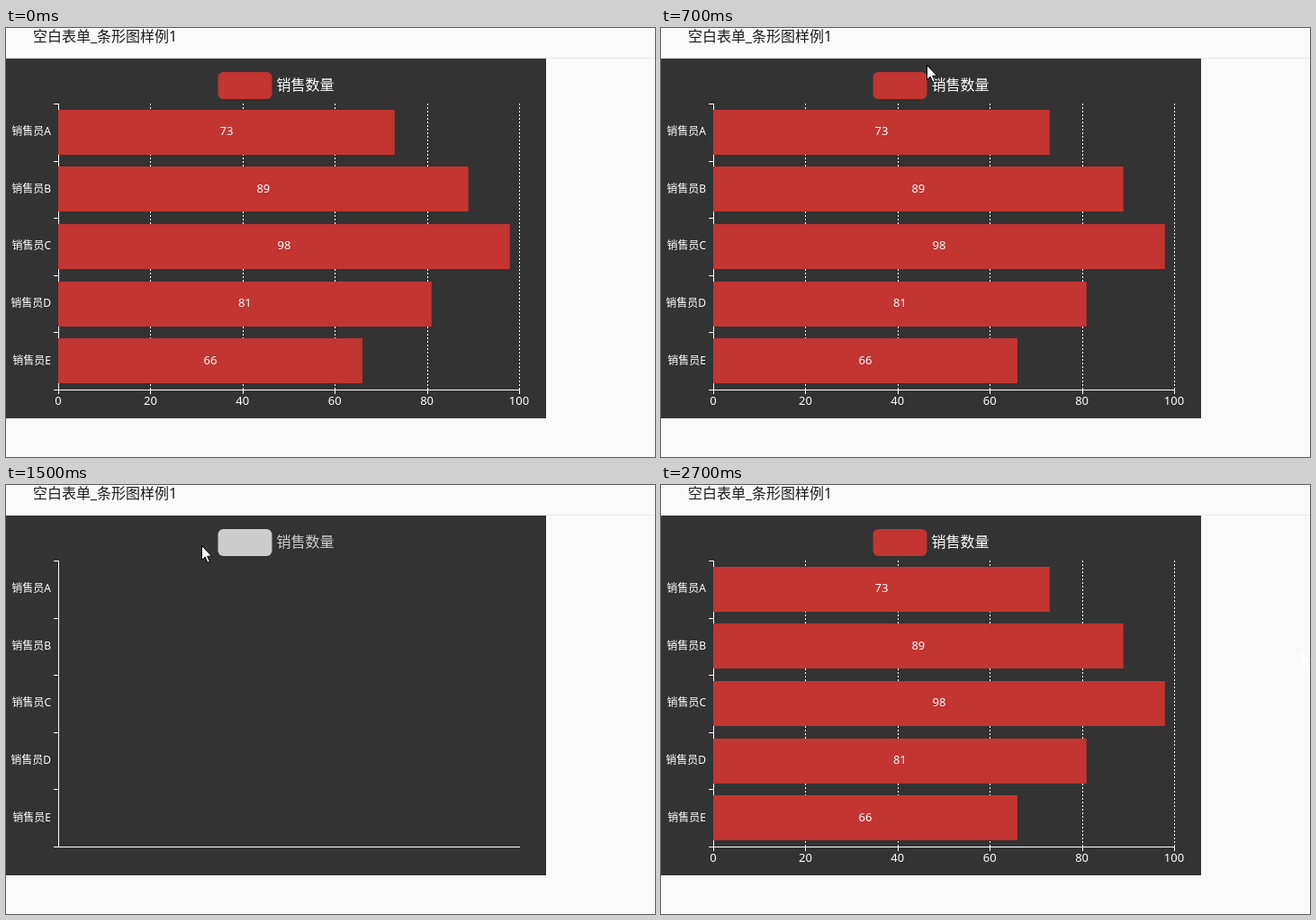
An HTML page with a canvas that plays this animation: 721 px wide and 477 px high, repeating every 3 s.

```html
<!DOCTYPE html>
<html lang="zh-CN">
<head>
<meta charset="utf-8">
<style>
  html, body { margin: 0; width: 100%; height: 100%; overflow: hidden; background: #fafafa; }
  canvas { display: block; }
</style>
</head>
<body>
<canvas id="stage" width="721" height="477"></canvas>
<script>
const ctx = document.getElementById('stage').getContext('2d');
const FONT = '"Noto Sans", "Noto Sans CJK SC", "Noto Sans CJK", sans-serif';
const LOOP = 3000, TICK = 100;
const RED = '#c23531', BRIGHT = '#d63a35', GREY = '#ccc';
const LEFT = 58, RIGHT = 570, TOP = 84, BOTTOM = 402;
const ROW = (BOTTOM - TOP) / 5, UNIT = (RIGHT - LEFT) / 100;
const data = [['A', 73], ['B', 89], ['C', 98], ['D', 81], ['E', 66]];

// [from tick, shape, x, y]; shape '' hides the pointer
const pointer = [
  [0, '', 0, 0],
  [3, 'arrow', 694, 376], [4, 'arrow', 388, 90], [5, 'arrow', 345, 70],
  [6, 'arrow', 313, 50], [7, 'arrow', 295, 41],
  [8, 'hand', 267, 55], [9, 'hand', 264, 62], [13, 'hand', 250, 64],
  [14, 'arrow', 226, 66], [15, 'arrow', 217, 67],
  [16, 'hand', 248, 69], [18, 'hand', 248, 68], [23, 'hand', 262, 70],
  [24, 'arrow', 377, 101], [25, 'arrow', 663, 208],
  [26, 'arrow', 690, 196], [27, 'arrow', 711, 184]
];
// [from tick, to tick, x, y, last tick with the row lit]
const tips = [[4, 5, 377, 120, 4], [24, 25, 397, 121, 24]];

const arrow = new Path2D('M.5 .5V16.5L4.2 13L7 19.3L9.4 18.2L6.7 12.2H11.6Z');
const hand = new Path2D('M6.2 .5C5 .5 4.6 1.5 4.6 2.5V13L3 11C2 9.8 .5 10.4 .6 11.8L4 17Q5.4 19 5.5 22.5H14Q14.3 19.5 16 16.5V9.6Q15.5 7.6 13.4 8.4Q12.5 6.6 10.6 7.5Q9.7 6 7.8 6.7V2.5C7.8 1.5 7.4 .5 6.2 .5Z');
const fingers = new Path2D('M7.8 7V11.5M10.6 7.8V11.5M13.4 8.6V12');

const cubicOut = t => 1 - (1 - t) ** 3;

function rect(x, y, w, h, fill, r = 0) {
  ctx.fillStyle = fill;
  ctx.beginPath();
  ctx.roundRect(x, y, w, h, r);
  ctx.fill();
}

function text(str, x, y, size, fill = '#fff', align = 'left', weight = 400) {
  ctx.font = `${weight} ${size}px ${FONT}`;
  ctx.textAlign = align;
  ctx.fillStyle = fill;
  ctx.fillText(str, x, y);
}

function drawPage() {
  rect(0, 0, 721, 477, '#fafafa');
  rect(0, 33, 721, 1, '#e8e8e8');
  text('空白表单_条形图样例1', 30, 15, 16, '#1a1a1a');
  rect(0, 34, 600, 400, '#333');
}

function drawAxes(on) {
  if (on) {
    ctx.strokeStyle = '#fff';
    ctx.lineWidth = 1;
    ctx.setLineDash([2, 2]);
    for (let v = 20; v <= 100; v += 20) {
      const x = Math.round(LEFT + v * UNIT) + .5;
      ctx.beginPath();
      ctx.moveTo(x, TOP);
      ctx.lineTo(x, BOTTOM);
      ctx.stroke();
    }
    ctx.setLineDash([]);
    for (let v = 0; v <= 100; v += 20) {
      const x = LEFT + v * UNIT;
      rect(Math.round(x), BOTTOM, 1, 5, '#fff');
      text(v, x, 419, 13, '#fff', 'center', 500);
    }
  }
  rect(LEFT, TOP, 1, BOTTOM - TOP + 1, '#fff');
  rect(LEFT, BOTTOM, RIGHT - LEFT + 1, 1, '#fff');
  for (let i = 0; i <= 5; i++) rect(53, Math.round(TOP + i * ROW - .1), 5, 1, '#fff');
  data.forEach(([name], i) =>
    text('销售员' + name, 50, TOP + i * ROW + 35.2, 12, '#fff', 'right', 500));
}

function drawBars(scale, isBright, labels) {
  data.forEach(([, value], i) => {
    const w = value * UNIT * scale, y = TOP + i * ROW;
    rect(LEFT, Math.round(y + 6.8), w, 50, isBright(i) ? BRIGHT : RED);
    if (labels) text(value, LEFT + w / 2, y + 35.2, 13, '#fff', 'center', 500);
  });
}

function drawTip(x, y) {
  rect(x, y, 104, 52, 'rgba(50,50,50,.7)', 4);
  text('销售员A', x + 5, y + 21, 14);
  rect(x + 5, y + 32, 10, 10, RED, 5);
  text('销售数量: 73', x + 19, y + 42, 14);
}

function drawPointer(shape, x, y) {
  if (!shape) return;
  const path = shape === 'hand' ? hand : arrow;
  ctx.save();
  ctx.translate(x, y);
  ctx.fillStyle = '#fff';
  ctx.fill(path);
  // the outline is only seen over the dark panel
  if (x < 600) {
    ctx.strokeStyle = '#000';
    ctx.lineWidth = 1;
    ctx.stroke(path);
    if (shape === 'hand') ctx.stroke(fingers);
  }
  ctx.restore();
}

function draw(tick) {
  const on = tick < 11 || tick >= 20;
  const tip = tips.find(t => tick >= t[0] && tick <= t[1]);
  const lit = tip && tick <= tip[4];
  const hover = tick >= 8 && tick <= 11;

  let scale = on ? 1 : 0;
  if (tick === 11) scale = 1 - cubicOut(.23);
  if (tick >= 20) scale = cubicOut(Math.min(1, (tick - 19) / 3));

  drawPage();
  rect(235.5, 49, 60, 30, on ? RED : GREY, 6);
  text('销售数量', 300.5, 68.5, 16, on ? '#fff' : GREY);
  drawAxes(on);
  if (scale) drawBars(scale, i => hover || (lit && i === 0), on);
  if (lit) rect(LEFT, TOP, RIGHT - LEFT, ROW, 'rgba(150,150,150,.3)');
  if (tip) drawTip(tip[2], tip[3]);
  const [, shape, x, y] = pointer.findLast(p => tick >= p[0]);
  drawPointer(shape, x, y);
}

const start = performance.now();
function loop(now) {
  draw(Math.floor(Math.max(0, now - start) % LOOP / TICK));
  requestAnimationFrame(loop);
}
draw(0);
requestAnimationFrame(loop);
</script>
</body>
</html>
```
